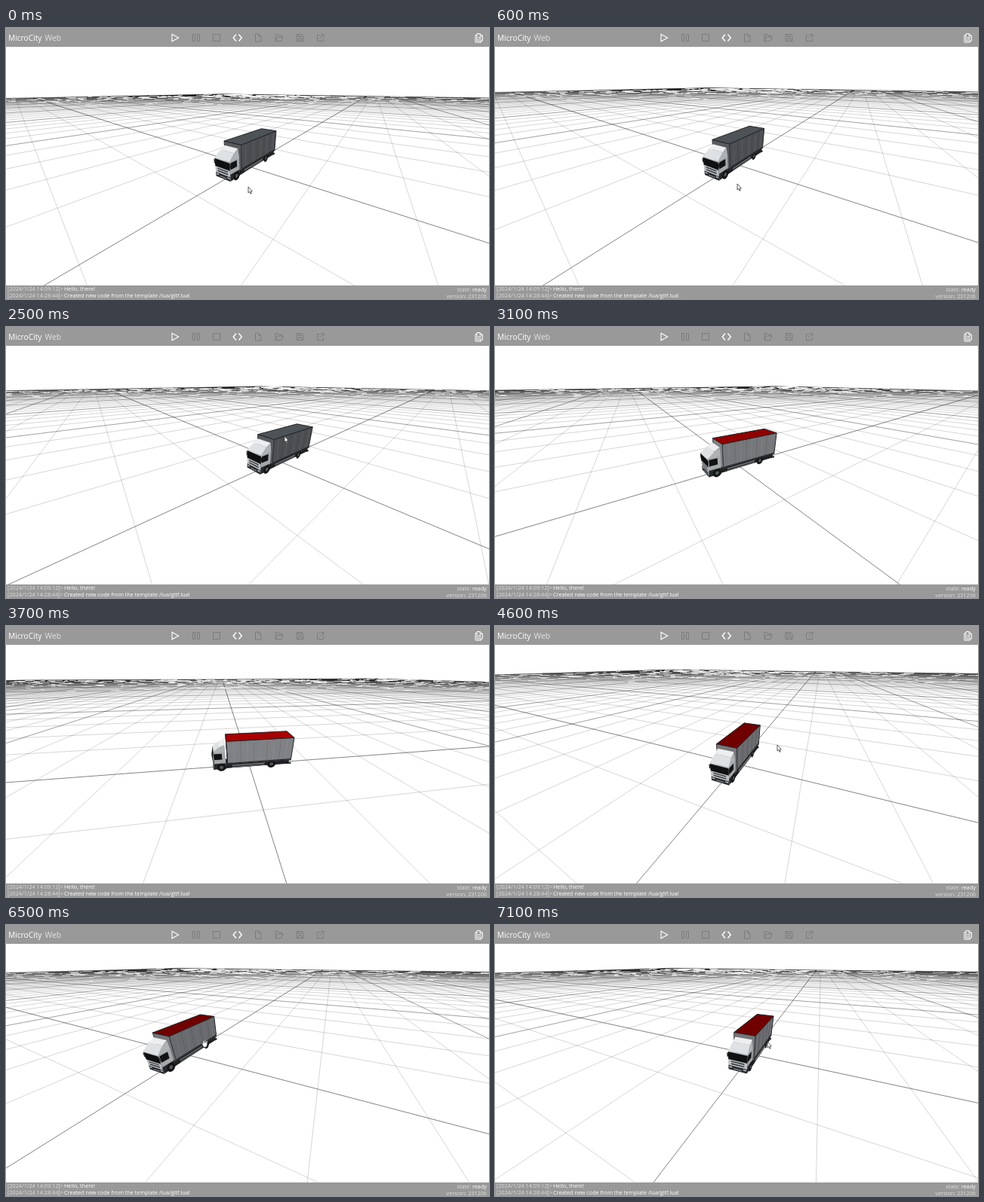
Animation of 640 by 360 pixels, one loop 7.4 s. Source, as an HTML page with a canvas:

```html
<!DOCTYPE html>
<html lang="en">
<head>
<meta charset="utf-8">
<title>Truck scene</title>
<style>
html, body { margin: 0; width: 100%; height: 100%; overflow: hidden; background: #fff; }
canvas { display: block; width: 640px; height: 360px; }
</style>
</head>
<body>
<canvas id="stage" width="640" height="360"></canvas>
<script>
const ctx = document.getElementById('stage').getContext('2d');
const LOOP = 7400, TOP = 25, BOTTOM = 342;
const CX = 320, CY = (TOP + BOTTOM) / 2;
const FOCAL = (BOTTOM - TOP) / 2 / Math.tan(37.5 * Math.PI / 180);
const DEPTH = 2.55, HALF_GRID = 50, NEAR = 0.05;

// time, yaw, pitch, screen x and y of the grid centre
const CAMERA = [
  [0, 36.4, 25.7, 320, 183.5], [300, 36, 25.7, 320, 183.5],
  [600, 35.5, 27.6, 319, 181], [1200, 34.6, 27.7, 315, 176.5],
  [1500, 48.7, 27.7, 361, 178], [2800, 48.7, 27.7, 361, 178],
  [3100, 58, 27.8, 322, 183.8], [3400, 70, 28.4, 322, 183.8],
  [3700, 81.5, 30, 322, 183.8], [4000, 65, 33.4, 321, 183.5],
  [4600, 24.5, 32.4, 321, 183.5], [5600, 24.5, 32.4, 321, 183.5],
  [6500, 24.5, 32.4, 240, 172.5], [7100, 24.5, 32.4, 340, 172]
];

// The picture advances in 300 ms steps, with three longer holds.
function stepTime(t) {
  const [start, last] = t < 2500 ? [0, 5] : t < 5600 ? [2500, 7] : [5600, 5];
  return start + 300 * Math.min(last, Math.floor((t - start) / 300));
}

function sample(keys, t) {
  const i = keys.findIndex(k => k[0] >= t);
  if (i <= 0) return keys[0].slice(1);
  const a = keys[i - 1], b = keys[i], f = (t - a[0]) / (b[0] - a[0]);
  return a.slice(1).map((v, j) => v + (b[j + 1] - v) * f);
}

function randomizer(seed) {
  return () => (seed = (seed * 16807) % 2147483647) / 2147483647;
}

let cam;
function setCamera(yaw, pitch, x, y) {
  const r = Math.PI / 180;
  cam = {
    yaw, sa: Math.sin(yaw * r), ca: Math.cos(yaw * r),
    sp: Math.sin(pitch * r), cp: Math.cos(pitch * r),
    x: (x - CX) / FOCAL * DEPTH, y: (y - CY) / FOCAL * DEPTH
  };
}

// u runs along the truck, w across it, h upwards
function toView(u, w, h = 0) {
  const ahead = u * cam.ca + w * cam.sa;
  return [
    cam.x + u * cam.sa - w * cam.ca,
    cam.y - ahead * cam.sp - h * cam.cp,
    DEPTH + ahead * cam.cp - h * cam.sp
  ];
}
const toScreen = ([x, y, z]) => [CX + x / z * FOCAL, CY + y / z * FOCAL];
const project = (u, w, h) => toScreen(toView(u, w, h));

function groundLine(a, b) {
  let p = toView(...a), q = toView(...b);
  if (p[2] < NEAR && q[2] < NEAR) return;
  if (p[2] > q[2]) [p, q] = [q, p];
  if (p[2] < NEAR) {
    const f = (NEAR - p[2]) / (q[2] - p[2]);
    p = p.map((v, i) => v + (q[i] - v) * f);
  }
  ctx.beginPath();
  ctx.moveTo(...toScreen(p));
  ctx.lineTo(...toScreen(q));
  ctx.stroke();
}

function drawGrid() {
  const n = HALF_GRID;
  ctx.lineWidth = 1;
  for (let i = -n; i <= n; i++) {
    const alpha = i === 0 ? 0.55 : i % 5 === 0 ? 0.42 : 0.18;
    ctx.strokeStyle = `rgba(30,30,30,${alpha})`;
    groundLine([i, -n], [i, n]);
    groundLine([-n, i], [n, i]);
  }
  breakUpHorizon();
}

// Short white gaps keep the crowded far lines from merging into a solid band.
function breakUpHorizon() {
  const random = randomizer(71);
  ctx.fillStyle = 'rgba(255,255,255,.6)';
  for (let i = 0; i < 1300; i++) {
    const u = (random() * 2 - 1) * HALF_GRID, w = (random() * 2 - 1) * HALF_GRID;
    const length = 3 + random() * 12;
    const view = toView(u, w);
    if (view[2] < 14) continue;
    const [x, y] = toScreen(view);
    ctx.fillRect(Math.round(x), Math.round(y), length, 1);
  }
}

function path(points, closed = true) {
  ctx.beginPath();
  points.forEach(p => ctx.lineTo(...p));
  if (closed) ctx.closePath();
}
function face(points, fill, edge) {
  path(points.map(p => project(...p)));
  ctx.fillStyle = fill;
  ctx.fill();
  if (edge) {
    ctx.strokeStyle = edge;
    ctx.lineWidth = 1;
    ctx.stroke();
  }
}
const rect = (a0, b0, a1, b1) => [[a0, b0], [a1, b0], [a1, b1], [a0, b1]];
function sideFace(w, box, fill, edge) {
  face(rect(...box).map(([u, h]) => [u, w, h]), fill, edge);
}
function frontFace(u, box, fill, edge) {
  face(rect(...box).map(([w, h]) => [u, w, h]), fill, edge);
}
function sideLine(w, u0, h0, u1, h1, color, width) {
  path([project(u0, w, h0), project(u1, w, h1)], false);
  ctx.strokeStyle = color;
  ctx.lineWidth = width;
  ctx.stroke();
}
function wheel(u, w) {
  const disc = (r, fill) => face(Array.from({ length: 16 }, (_, i) => {
    const a = i * Math.PI / 8;
    return [u + r * Math.cos(a), w, 0.065 + r * Math.sin(a)];
  }), fill);
  disc(0.066, '#151515');
  disc(0.028, '#55595d');
}

const gray = v => `rgb(${v},${v + 2},${v + 5})`;

function drawTruck(selected) {
  const W = 0.15, front = -0.56, box = -0.345, rear = 0.64, roof = 0.48;
  const turn = cam.yaw - 24.5;
  const side = Math.round(selected ? 104 + turn * 0.4 : 76);
  const red = Math.round(112 + turn);

  // chassis and wheels
  wheel(0.33, W);
  face([[-0.53, -W, 0.05], [0.6, -W, 0.05], [0.6, W, 0.05], [-0.53, W, 0.05]], '#1c1c1e');
  sideFace(-W, [-0.36, 0.055, 0.61, 0.12], '#202124');
  sideLine(-W, -0.28, 0.09, 0.22, 0.09, '#b8babc', 0.8);
  sideLine(-W, -0.28, 0.06, 0.22, 0.06, '#8a8c8e', 0.8);
  wheel(0.33, -W);
  sideLine(-W, 0.58, 0.06, 0.65, 0.06, '#222', 2);

  // cargo box
  sideFace(-W, [box, 0.115, rear, roof], gray(side), '#26282b');
  for (let i = 1; i < 10; i++) {
    const u = box + (rear - box) * i / 10;
    sideLine(-W, u, 0.14, u, 0.46, i % 2 ? 'rgba(255,255,255,.07)' : 'rgba(0,0,0,.1)', 1);
  }
  sideLine(-W, box, 0.13, rear, 0.13, '#25272a', 1.3);
  frontFace(box, [-W, 0.115, W, roof], gray(side + 12), '#33363a');
  face([[box, -W, roof], [rear, -W, roof], [rear, W, roof], [box, W, roof]],
    selected ? `rgb(${red},0,0)` : '#4d5356', '#202326');

  // cab
  const cabW = 0.135, back = -0.37;
  sideFace(-cabW, [front, 0.07, back, 0.32], '#a4a8ab');
  sideFace(-cabW, [front, 0.03, back, 0.13], '#26282b');
  sideFace(-cabW, [-0.545, 0.195, -0.42, 0.29], '#111315');
  wheel(-0.44, -cabW - 0.007);
  face([[front, -cabW, 0.31], [back, -cabW, 0.31], [back, -0.12, 0.42], [-0.45, -0.12, 0.39]], '#aeb2b5');
  face([[front, -cabW, 0.31], [front, cabW, 0.31], [-0.45, 0.12, 0.39], [-0.45, -0.12, 0.39]], '#dfe2e4');
  face([[-0.45, -0.12, 0.39], [-0.45, 0.12, 0.39], [back, 0.12, 0.43], [back, -0.12, 0.43]], '#eceeef');
  frontFace(front, [-cabW, 0.03, cabW, 0.31], '#bcc0c3');
  frontFace(front, [-cabW, 0.185, cabW, 0.295], '#0e1011');
  frontFace(front, [-0.095, 0.15, 0.095, 0.168], '#3b3e41');
  frontFace(front, [-0.095, 0.112, 0.095, 0.132], '#34373a');
  frontFace(front, [-cabW, 0.025, cabW, 0.092], '#25282b');
  frontFace(front, [-0.125, 0.055, -0.08, 0.08], '#a4a8ab');
  frontFace(front, [0.08, 0.055, 0.125, 0.08], '#a4a8ab');
  frontFace(front, [-0.06, 0.04, 0.06, 0.06], '#777b7e');
  frontFace(front, [-0.152, 0.22, -cabW, 0.28], '#17191b');
  frontFace(front, [cabW, 0.22, 0.152, 0.28], '#17191b');
}

function arrow(x, y) {
  path([[0, 0], [0, 8], [1.8, 6.4], [3, 9.4], [4.3, 8.8], [3.1, 6], [5.4, 6]]
    .map(([a, b]) => [x + a, y + b]));
  ctx.fillStyle = '#fff';
  ctx.fill();
  ctx.strokeStyle = '#333';
  ctx.lineWidth = 0.8;
  ctx.stroke();
}
function hand(x, y) {
  path([[-4, -1], [-2, 0], [-2, -4], [-0.8, -4], [0, -1], [0.3, -5], [1.5, -5],
    [1.7, -1], [3, -4], [4, -3], [3, 3], [1.5, 5], [-1.5, 4]].map(([a, b]) => [x + a, y + b]));
  ctx.fillStyle = '#fff';
  ctx.fill();
  ctx.strokeStyle = '#444';
  ctx.lineWidth = 0.5;
  ctx.stroke();
}
function drawPointer(t, x, y) {
  if (t < 600) arrow(321, 211);
  else if (t < 1500) arrow(321, 207);
  else if (t < 2500) arrow(338, 207);
  else if (t < 2800) arrow(369, 145);
  else if (t < 3100) arrow(367, 141);
  else if (t < 4600) return;
  else if (t < 5600) arrow(374, 158);
  else if (t < 5900) arrow(329, 163);
  else if (t < 7100) hand(x + 23, y - 15);
  else arrow(x + 21, y - 17);
}

function text(str, x, y, size, color, align = 'left', weight = 400) {
  ctx.font = `${weight} ${size}px "Open Sans", "Noto Sans", sans-serif`;
  ctx.textAlign = align;
  ctx.fillStyle = color;
  ctx.fillText(str, x, y);
  return ctx.measureText(str).width;
}

function drawIcons() {
  const icon = (color, shapes, width = 1) => {
    ctx.strokeStyle = color;
    ctx.lineWidth = width;
    ctx.stroke(new Path2D(shapes));
  };
  const on = '#fff', off = '#7c7c7c';
  icon(on, 'M220 8.2L228.7 13L220 17.8Z', 1.1);
  icon(off, 'M247.5 8.5h3v9h-3zM253.5 8.5h3v9h-3z');
  icon(off, 'M274.5 8.5h9v9h-9z');
  icon(on, 'M305 8.5L301.2 13L305 17.5M308.5 8.5L312.3 13L308.5 17.5', 1.4);
  icon(off, 'M330.5 8h4.5l3 3v7h-7.5zM335 8v3h3');
  icon(off, 'M357 17.5V8.5h3.5l1 1.5h4v2M357 17.5l2.3-5.5h8l-2.3 5.5z');
  icon(off, 'M385 8.5h7l2 2v7h-9zM387 8.5v3h4.5v-3M387 17.5v-3.5h5v3.5');
  icon(off, 'M416 9.5h-3.5v8h8v-3.5M417 8.5h4v4M421 8.5L415.5 14');
  icon(on, 'M624 7.5h4l3.5 3v6.5h-7.5zM628 7.5v3h3.5M624 9.5h-2v9.5h7.5v-2M625.5 12.5h4.5M625.5 14.7h4.5');
}

function drawBars() {
  ctx.fillStyle = '#999';
  ctx.fillRect(0, 0, 640, TOP);
  ctx.fillRect(0, BOTTOM, 640, 360 - BOTTOM);
  text('MicroCity', 3, 17, 10.2, '#fff', 'left', 500);
  text('Web', 51.5, 17, 10.4, '#e2e2e2');
  drawIcons();

  ctx.save();
  ctx.beginPath();
  ctx.rect(0, BOTTOM, 640, 360 - BOTTOM);
  ctx.clip();
  const dim = '#dedede', size = 7.25;
  text('[2024/1/24 14:09:12]>', 2, 348.5, size, dim);
  text('Hello, there!', 77, 348.5, size, '#fff');
  text('[2024/1/24 14:28:44]>', 2, 358, size, dim);
  text('Created new code from the template /lua/gltf.lua!', 77, 358, size, '#fff');
  const width = text('ready', 637, 349.5, size, '#fff', 'right');
  text('state: ', 637 - width, 349.5, size, dim, 'right');
  text('version: 231206', 637, 358.7, size, dim, 'right');
  ctx.restore();
}

function draw(now) {
  const t = stepTime(now % LOOP);
  const [yaw, pitch, x, y] = sample(CAMERA, t);
  setCamera(yaw, pitch, x, y);
  ctx.fillStyle = '#fff';
  ctx.fillRect(0, 0, 640, 360);
  ctx.save();
  ctx.beginPath();
  ctx.rect(0, TOP, 640, BOTTOM - TOP);
  ctx.clip();
  ctx.lineJoin = 'round';
  drawGrid();
  drawTruck(t >= 3100);
  drawPointer(t, x, y);
  ctx.restore();
  drawBars();
}

const begin = performance.now();
function tick() {
  draw(performance.now() - begin);
  requestAnimationFrame(tick);
}
tick();
</script>
</body>
</html>
```
